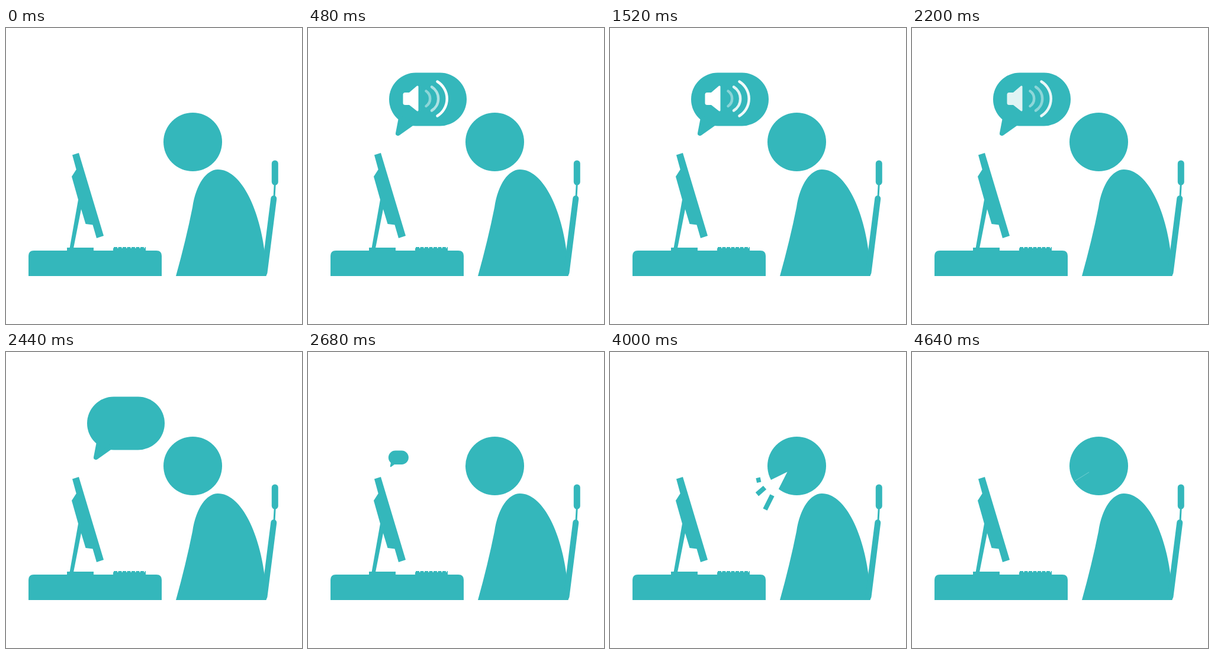
An HTML page for the animation above (5 s loop, 500x500 px).

```html
<!DOCTYPE html>
<html>
<head>
<meta charset="utf-8">
<style>
  html, body { margin: 0; height: 100%; overflow: hidden; background: #fff; }
  svg { display: block; width: 100%; height: 100%; }
</style>
</head>
<body>
<svg viewBox="0 0 500 500" fill="#34b7bb" stroke="none">
  <!-- desk and computer -->
  <path d="M38 419V385Q38 376 47 376H254Q263 376 263 385V419Z"/>
  <path d="M103 377V371H148V377ZM181 377V372H236V377Z"/>
  <path d="M182 371.5H236" stroke="#34b7bb" stroke-width="3" stroke-dasharray="6 1.5"/>
  <path d="M112 214.5L123 211L165 351L153 355L146.500 332.500L134.500 331L127 306L114 372H107.500L122 290L111 251L118.700 239Z"/>

  <!-- person and chair -->
  <circle cx="315.5" cy="192.500" r="49.500"/>
  <path d="M287 419Q304 358 315 303C321 263 339 239 358 239C395 239 427 300 437 378L441 414L439.500 419Z"/>
  <g stroke="#34b7bb" stroke-linecap="round">
    <path d="M452.300 288L436.500 413" stroke-width="10"/>
    <path d="M454.300 262L453 286" stroke-width="3"/>
    <path d="M454.300 229V260" stroke-width="11"/>
  </g>

  <path id="mouth" fill="#fff"/>
  <path id="crease" d="M275 218L299 203" stroke="#fff" stroke-opacity=".3"/>
  <g id="dashes" stroke="#34b7bb" stroke-width="8"></g>

  <g id="bubble">
    <rect x="137" y="75.500" width="131" height="90" rx="45"/>
    <path d="M157 152L152 178L176 161Z" stroke="#34b7bb" stroke-width="8" stroke-linejoin="round"/>
    <g id="speaker" fill="#fff">
      <rect x="160.500" y="109" width="14" height="21" rx="3.500"/>
      <path d="M171 111L185 99V139L171 128Z" stroke="#fff" stroke-width="3" stroke-linejoin="round"/>
    </g>
    <g id="waves" fill="none" stroke="#fff" stroke-width="4.500" stroke-linecap="round">
      <path d="M199.500 106.500A15.500 15.500 0 0 1 199.500 132"/>
      <path d="M209 99.500A23.500 23.500 0 0 1 209 139.500"/>
      <path d="M218.500 90.500A34 34 0 0 1 218.500 148.500"/>
    </g>
  </g>
</svg>
<script>
const LOOP = 5000, STEP = 40, WAVE = 560, TALK = 460;
const $ = id => document.getElementById(id);
const ramp = (t, a, b) => Math.min(1, Math.max(0, (t - a) / (b - a)));
const smooth = (t, a, b) => { const p = ramp(t, a, b); return p * p * (3 - 2 * p); };
const swing = turns => (1 + Math.cos(2 * Math.PI * turns)) / 2;

// base point, full reach and start time of each speech dash
const dashes = [
  { x: 254.5, y: 215.5, dx: -30, dy: 6.5, start: 3005 },
  { x: 261.5, y: 229, dx: -23, dy: 20, start: 2955 },
  { x: 274, y: 242, dx: -13.5, dy: 27, start: 3260 }
].map(d => {
  const path = document.createElementNS('http://www.w3.org/2000/svg', 'path');
  $('dashes').append(path);
  return { ...d, path };
});

function drawBubble(t) {
  const leaving = t > 1400;
  const scale = leaving ? 1 - smooth(t, 2440, 2800) : smooth(t, 0, 360);
  const [x, y] = leaving ? [135.5, 198.5] : [132, 195];
  $('bubble').setAttribute('transform',
    `translate(${x} ${y}) scale(${scale}) translate(${-x} ${-y})`);
  $('bubble').style.display = scale > 0 ? '' : 'none';

  const fade = delay => ramp(t, 220 + delay, 440 + delay) * (1 - ramp(t, 2160 + delay, 2420));
  $('speaker').style.opacity = fade(0);
  [...$('waves').children].forEach((wave, i) => {
    const peak = 0.28 + 0.27 * i;
    wave.style.opacity = fade(i * 15) * (0.4 + 0.6 * swing(t / WAVE - peak));
  });
}

function drawSpeech(t) {
  const open = smooth(t, 2800, 3000) * (1 - smooth(t, 4440, 4640));
  const top = 153.9, angle = top - 37 * open * (0.35 + 0.65 * swing((t - 4000) / TALK));
  const edge = deg => {
    const a = deg * Math.PI / 180;
    return `L${299.5 + 42 * Math.cos(a)} ${202.5 + 42 * Math.sin(a)}`;
  };
  $('mouth').setAttribute('d', open ? `M299.5 202.5${edge(top)}${edge(angle)}Z` : '');
  $('crease').style.display = t >= 4640 ? '' : 'none';

  for (const { x, y, dx, dy, start, path } of dashes) {
    const turns = (t - start) / TALK;
    const k = turns > 0 && turns < 3 ? 1 - swing(turns) : 0;
    path.setAttribute('d', k > 0.01 ? `M${x} ${y}l${dx * k} ${dy * k}` : '');
  }
}

function frame() {
  const t = Math.floor(performance.now() % LOOP / STEP) * STEP;
  drawBubble(t);
  drawSpeech(t);
  requestAnimationFrame(frame);
}
frame();
</script>
</body>
</html>
```
